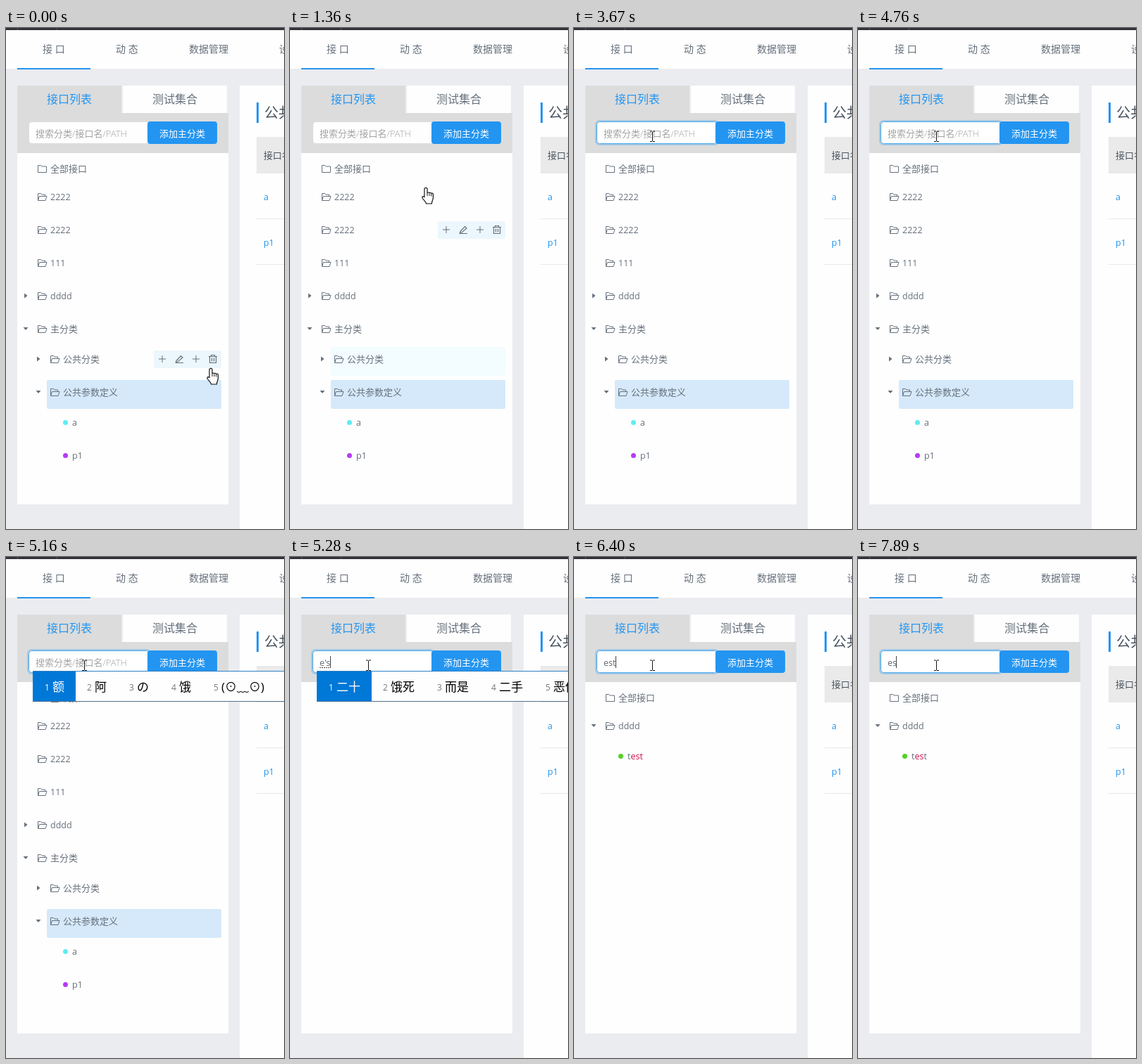
These frames come from a looping animation (395x713 px, 8000 ms). An HTML page:

```html
<!DOCTYPE html>
<html lang="zh">
<head>
<meta charset="utf-8">
<style>
html, body { margin: 0; width: 100%; height: 100%; overflow: hidden; background: #ebecf0; }
svg { display: block; width: 395px; height: 713px; }
text { font-family: "Open Sans", "Noto Sans CJK SC", "Noto Sans CJK JP", sans-serif; white-space: pre; }
</style>
</head>
<body>
<svg id="stage" viewBox="0 0 395 713"><g id="page"></g><g id="live"></g></svg>
<script>
const BLUE = '#2395f1', INK = '#66707c';

const rect = (x, y, w, h, fill, extra = '') =>
  `<rect x="${x}" y="${y}" width="${w}" height="${h}" fill="${fill}" ${extra}/>`;
const text = (x, mid, s, size = 13, fill = INK, weight = 400) =>
  `<text x="${x}" y="${Math.round(mid + size * .37)}" font-size="${size}" fill="${fill}" font-weight="${weight}">${s}</text>`;
const line = (x, y, d, color = INK, width = 1) =>
  `<path transform="translate(${x} ${y})" d="${d}" fill="none" stroke="${color}" stroke-width="${width}"/>`;
const shape = (x, y, d, fill = INK, extra = '') =>
  `<path transform="translate(${x} ${y})" d="${d}" fill="${fill}" ${extra}/>`;

const CLOSED = 'M.5 .5h4l1.5 1.5h6.5v8.5h-12z';
const OPEN = 'M.5 10.5V.5h4l1.5 1.5h4.5v2.5M.5 10.5l2-6h10.5l-2 6z';
const RIGHT = 'M-2-3.5L2.5 0L-2 3.5z', DOWN = 'M-3.5-2h7L0 2z';
const HAND = 'M4 13V2.3a2 2 0 0 1 4 0V8c0-1.5 3-1.3 3 .3 0-1.4 2.8-1.1 2.8.5 0-1.2 2.6-.9 2.6.8v5c0 3-2 4.5-2 8.4H6.5c0-3-5.7-6.500-5.700-9 0-1.800 2.200-2 3.200 0z';
const BEAM = 'M-3.5-7h3M.5-7h3M0-6.500V7M-3.500 7.500h3M.5 7.500h3';

const folder = (x, y, name, arrow, icon = OPEN) =>
  (arrow ? shape(x - 17, y, arrow) : '') + line(x, y - 5, icon) +
  text(x + 18, y, name, /[a-z0-9]/.test(name) ? 12.5 : 13);
const dot = (x, y, color, name) =>
  `<circle cx="${x}" cy="${y + .5}" r="3.5" fill="${color}"/>` + text(x + 9.5, y, name, 12.5);

const page = [
  rect(0, 0, 395, 713, '#ebecf0'),
  rect(0, 0, 395, 58, '#fefefe'),
  rect(0, 0, 395, 3, '#31313a'),
  rect(16, 0, 1, 3, '#55555e'), rect(72, 0, 1, 3, '#55555e'),
  text(52, 30, '接 口', 14), text(156, 30, '动 态', 14),
  text(260, 30, '数据管理', 14), text(388, 30, '设', 14),
  rect(16, 57, 104, 2, BLUE),
  rect(16, 121, 300, 557, '#fefefe'),
  rect(16, 82, 148, 39, '#dcdcdc'), rect(166, 82, 148, 39, '#fefefe'),
  rect(16, 121, 300, 57, '#dcdcdc'),
  text(58, 101, '接口列表', 16, BLUE), text(208, 101, '测试集合', 16),
  rect(332, 82, 63, 631, '#fefefe'),
  rect(356, 106, 3, 29, BLUE), text(367, 121, '公共', 20, '#47525e'),
  rect(356, 155, 39, 52, '#eaeaea'), text(366, 181, '接口名', 13, '#4a545f'),
  text(366, 240, 'a', 12.5, BLUE), rect(356, 271, 39, 1, '#e8e8e8'),
  text(366, 305, 'p1', 12.5, BLUE), rect(356, 336, 39, 1, '#e8e8e8')
].join('');

const all = folder(45, 200, '全部接口', '', CLOSED);
const lists = {
  full: rect(58, 501, 248, 41, '#d5e9fa', 'rx="2"') + all +
    folder(45, 240, '2222') + folder(45, 287, '2222') + folder(45, 334, '111') +
    folder(45, 381, 'dddd', RIGHT) + folder(45, 428, '主分类', DOWN) +
    folder(63, 471, '公共分类', RIGHT) + folder(63, 518, '公共参数定义', DOWN) +
    dot(84.5, 561, '#5fecf5', 'a') + dot(84.5, 608, '#b43cf5', 'p1'),
  none: '',
  found: all + folder(45, 240, 'dddd', DOWN)
};

function tools(y) {
  const plus = 'M-5 0H5M0-5V5';
  return rect(210, y - 12, 96, 25, '#ecf6fd', 'rx="2"') +
    line(222, y, plus) + line(270, y, plus) +
    line(246, y, 'M-4 2.500L2.500-4.500l2.500 2.500L-2 4l-2.500.5zM-5.500 5.500h11.500', INK, 1.2) +
    line(294, y, 'M-6-3.500H6M-2.500-3.500v-2h5v2M-4.500-3.500v9h9v-9M-1.500-1.500v5M1.500-1.500v5', INK, 1.2);
}

// Candidate bar of the input method
function candidates(words) {
  let x = 38, out = rect(38, 162, 360, 44, '#fefefe');
  words.forEach((word, i) => {
    const width = 43 + 17 * word.length;
    if (!i) out += rect(38, 162, width + 1, 44, '#0078d7');
    out += text(x + 17, 186, i + 1, 12, i ? '#777' : '#fff') +
      text(x + 28, 185, word.replace(/[()]/g, '$&'), 17, i ? '#000' : '#fff');
    x += word.length === 1 ? 60 : width;
  });
  return out + rect(38, 162, 360, 1, '#2f7fc4') + rect(38, 205, 360, 1, '#54718c');
}

function draw(s) {
  let out = s.hover ? rect(58, 454, 248, 41, '#f3fcff', 'rx="2"') : '';
  out += lists[s.list];
  if (s.match) {
    const [a, hit, b] = s.match, red = `<tspan fill="#d0104c">${hit}</tspan>`;
    out += dot(66.5, 283, '#57cf27', a + red + b);
  }
  if (s.tools) out += tools(s.tools);
  if (s.glow) out += rect(31, 132, 174, 34, 'none', `rx="5" stroke="${BLUE}" stroke-width="2" opacity="${s.glow}"`);
  out += s.border ? rect(32.5, 133.5, 171, 31, '#fff', `rx="4" stroke="${s.border}"`)
                  : rect(33, 134, 171, 30, '#fefefe', 'rx="4"');
  out += s.value ? text(42, 150, s.value, 12.5, '#5f6975')
                 : text(42, 150, '搜索分类/接口名/PATH', 13, '#a3a3a3', 300);
  if (s.words && s.value) out += line(42, 157.5, `M0 0H${s.caret - 42}`, '#444', '1" stroke-dasharray="2 1');
  if (s.caret) out += rect(s.caret, 141, 1, 17, '#444');
  out += rect(201, 133, 99, 32, BLUE, 'rx="4"') + text(218, 150, '添加主分类', 13, '#fff', 500);
  if (s.words) out += candidates(s.words);
  if (s.hand) out += shape(...s.hand, HAND, '#fff', 'stroke="#111" stroke-width="1.2"') +
    line(...s.hand, 'M8 8v4M11 8.500v3.500M13.800 9v3.500', '#111');
  if (s.beam) out += line(...s.beam, BEAM, '#111');
  return out;
}

// Each step changes only what it names
const steps = [
  [0, { list: 'full', hand: [285, 484], tools: 471 }],
  [1360, { hand: [187, 227], tools: 287, hover: true }],
  [1490, { hand: null, tools: 0, hover: false, beam: [138.5, 150], border: '#a5d3f6' }],
  [1640, { border: '#49a9ee' }],
  [1790, { beam: [111.5, 154] }],
  [2190, { caret: 42, glow: .08 }],
  [2310, { glow: .3 }],
  [2680, { caret: 0 }],
  [3240, { caret: 42 }],
  [3670, { caret: 0 }],
  [4230, { caret: 42 }],
  [4760, { caret: 0 }],
  [5160, { words: ['额', '阿', 'の', '饿', '(⊙﹏⊙)'] }],
  [5280, { list: 'none', value: "e's", caret: 57, words: ['二十', '饿死', '而是', '二手', '恶俗'] }],
  [5840, { value: "e's't", caret: 65, words: ['二十天', '二十条', '饿三天', '二食堂'] }],
  [6400, { list: 'found', value: 'est', caret: 59, words: null, match: ['t', 'est', ''] }],
  [6960, { caret: 0 }],
  [7390, { caret: 59 }],
  [7890, { value: 'es', caret: 54, match: ['t', 'es', 't'] }]
];
let state = {};
const views = steps.map(([, change]) => draw(state = { ...state, ...change }));

document.getElementById('page').innerHTML = page;
const live = document.getElementById('live');
const start = performance.now();
let shown = -1;
function tick() {
  const t = (performance.now() - start) % 8000;
  const now = steps.filter(([at]) => at <= t).length - 1;
  if (now !== shown) live.innerHTML = views[shown = now];
  requestAnimationFrame(tick);
}
tick();
</script>
</body>
</html>
```
